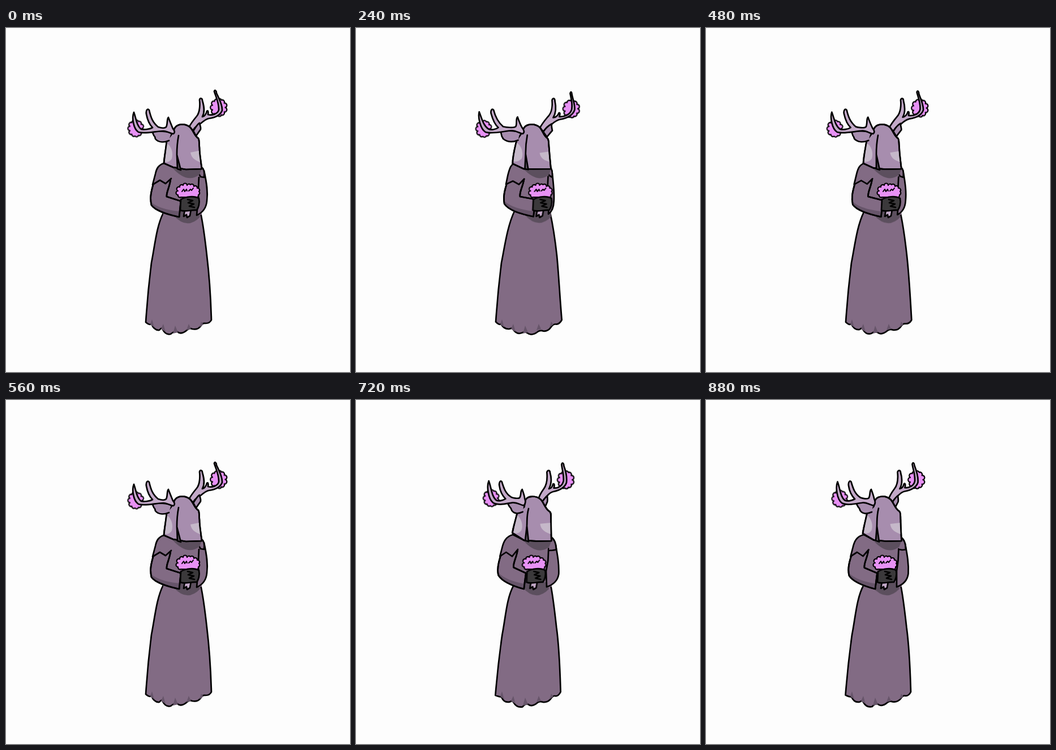
Animation, 608 px wide and 608 px high, one loop 0.96 s. Source, as an HTML page without scripts:

```html
<!DOCTYPE html>
<html lang="en">
<head>
<meta charset="utf-8">
<title>Swaying deer figure</title>
<style>
html, body { margin: 0; width: 100%; height: 100%; overflow: hidden; background: #fdfdfd; }
svg { display: block; width: 100vw; height: 100vh; }
path { stroke: #000; stroke-width: 2.7; stroke-linejoin: round; stroke-linecap: round; }

/* Each part has three poses: --a middle, --b right, --c left */
.m { d: var(--a); animation: morph .96s infinite; }
.t { animation: shift .96s infinite; }
@keyframes morph {
  0% { d: var(--a); animation-timing-function: steps(4); }
  33.333% { d: var(--b); animation-timing-function: steps(3); }
  58.333% { d: var(--a); animation-timing-function: steps(3); }
  83.333% { d: var(--c); animation-timing-function: steps(2); }
  100% { d: var(--a); }
}
@keyframes shift {
  0% { transform: none; animation-timing-function: steps(4); }
  33.333% { transform: translate(var(--b)); animation-timing-function: steps(3); }
  58.333% { transform: none; animation-timing-function: steps(3); }
  83.333% { transform: translate(var(--c)); animation-timing-function: steps(2); }
  100% { transform: none; }
}

.dress { fill: #826b84; }
.dim { fill: #67556a; }
.shade { fill: #5c4f5e; }
.head { fill: #a78dae; }
.light { fill: #c5b8c9; }
.antler { fill: #c3a9c8; }
.pink { fill: #e891f5; stroke-width: 2.2; }
.glove { fill: #3b393b; }
.flat { stroke: none; }
.line { fill: none; }

.skirt {
  --a: path("M278 327C266 350 263 385 257 415C252 455 249 490 247 520Q254 526 257 523Q262 535 271 534Q276 528 277 533Q282 543 291 541Q298 535 303 537Q310 543 321 533Q325 530 329 532Q339 534 344 527Q347 521 353 522Q360 522 363 516C362 480 359 435 355 402C352 375 348 345 344 327");
  --b: path("M281 322C268 350 263 385 257 415C252 455 249 490 247 519Q253 526 256 523Q262 533 272 531Q277 530 279 534Q285 542 294 538Q299 536 303 540Q311 546 323 537Q328 535 332 537Q340 537 345 529Q349 524 353 524Q359 525 364 516C360 480 358 435 355 402C352 375 347 345 343 327");
  --c: path("M279 328C266 350 265 385 259 415C253 455 249 490 246 523Q253 524 257 526Q262 537 273 533Q277 532 279 535Q285 545 296 543Q300 537 304 538Q312 544 322 535Q326 533 331 535Q339 535 344 529Q349 522 353 524Q357 524 361 516C360 480 359 435 354 402C351 375 348 345 344 327");
}
.torso {
  --a: path("M283 245L346 250L346 330L278 330Z");
  --b: path("M290 245L344 250L344 330L281 330Z");
  --c: path("M274 250L345 250L346 330L279 330Z");
}
.neck {
  --a: path("M294 247Q320 276 342 259L346 249Z");
  --b: path("M296 249Q322 276 341 259L344 249Z");
  --c: path("M296 248Q320 276 341 260L345 249Z");
}
.arm-r {
  --a: path("M341 264L340 284L340 300L337 331C348 326 354 318 355 306C357 290 355 275 350 252");
  --b: path("M339 262L338 284L342 300L341 328C346 324 348 316 348 306C349 290 347 275 345 252");
  --c: path("M340 262L339 284L334 304L337 330C348 327 358 320 360 308C360 290 357 275 354 256");
}
.cape-r {
  --a: path("M346 246C350 249 351 256 350 264L344 263L341 258");
  --b: path("M344 248C345 250 346 256 346 264L341 260L339 256");
  --c: path("M344 240C351 244 355 252 356 265L349 267L341 270");
}
.arm-l {
  --a: path("M262 270C256 290 254 300 257 313C264 323 284 329 306 334L309 306L284 298C283 290 290 280 291 266");
  --b: path("M270 270C264 288 262 298 264 310C272 322 292 328 316 333L320 302L292 298C290 290 297 280 299 267");
  --c: path("M256 268C249 284 246 298 249 308C256 320 272 328 292 334L296 306L276 295C274 286 282 276 283 263");
}
.cuff-l {
  --a: path("M257 313C264 323 284 329 305 333L306 324C285 322 265 316 257 308Z");
  --b: path("M264 310C272 322 292 328 315 332L316 324C294 321 274 315 264 305Z");
  --c: path("M249 308C256 320 272 328 291 333L292 325C274 321 258 314 249 304Z");
}
.cape-l {
  --a: path("M314 252L296 246L284 238C270 240 266 248 264 258L259 277L272 269L282 275L292 266");
  --b: path("M304 251L297 250L283 238C274 240 273 250 270 260L267 276L279 271L290 277L299 267");
  --c: path("M304 250L298 249L274 238C262 242 258 252 255 264L252 276L262 269L273 277L283 263");
}
.antler-r {
  --a: path("M323 176C326 170 332 162 337 156C343 149 343 134 342 127C343 123 347 124 347 128C350 138 352 148 347 157C350 157 354 152 355 147C357 145 358 148 357 153C364 155 374 152 376 145C377 133 371 122 368 112C369 108 372 111 372 115C376 124 383 136 382 146C378 156 366 159 358 160C350 162 345 169 340 172C336 173 332 178 331 181Z");
  --b: path("M325 178C329 170 334 164 339 158C347 151 349 139 348 128C349 123 353 124 353 129C355 139 354 151 349 159C353 159 358 156 360 151C362 150 362 154 360 158C370 158 381 153 383 143C385 134 383 124 382 117C383 112 385 114 385 119C386 128 389 137 388 144C385 154 374 160 362 162C355 163 349 168 346 171C340 172 335 180 333 184Z");
  --c: path("M321 178C322 171 325 164 329 158C335 150 336 140 335 128C337 123 341 124 341 129C344 139 342 149 338 157C342 157 344 153 345 149C347 148 348 152 346 157C355 157 361 150 362 142C363 132 361 124 361 115C362 110 365 112 365 117C368 126 368 138 367 146C364 156 352 161 344 163C338 164 336 168 334 171C332 174 330 178 329 181Z");
}
.ear-r {
  --a: path("M331 182C335 176 338 170 342 168C343 173 345 176 344 179C341 184 338 187 336 191Z");
  --b: path("M331 184C334 179 342 173 347 170C346 176 347 179 348 182C344 186 341 190 338 193Z");
  --c: path("M328 179C331 175 334 172 336 170C336 174 336 178 335 181C334 184 334 186 333 189Z");
}
.hood {
  --a: path("M284 199C283 212 280 226 279 239L295 246L318 250L346 249C345 238 342 224 342 212C341 204 342 198 340 195C333 191 332 182 325 175C316 168 303 169 298 177L294 186Z");
  --b: path("M284 198C280 212 276 224 276 240L297 250L312 249L344 249C343 238 342 224 341 212C340 203 341 198 338 195C331 191 330 182 325 176C316 168 301 169 296 177L292 186Z");
  --c: path("M285 201C282 212 277 222 275 233L298 249L318 249L345 249C345 238 346 222 346 212C346 204 347 199 343 198C335 193 333 183 328 177C319 168 303 169 300 177L299 190Z");
}
.light-l {
  --a: path("M284 204C292 208 296 220 293 231C290 236 286 237 281 237Z");
  --b: path("M283 202C292 206 297 222 293 230C288 236 282 236 277 236Z");
  --c: path("M284 203C292 208 296 222 292 230C287 237 281 236 277 233Z");
}
.light-r {
  --a: path("M326 220L341 217L344 238C337 234 328 232 326 220Z");
  --b: path("M324 221L340 219L341 236C334 234 326 232 324 221Z");
  --c: path("M325 218L345 217L345 237C336 234 326 230 325 218Z");
}
.slit {
  --a: path("M305 190C302 206 302 214 302 224L303 249L309 251L302 224");
  --b: path("M302 189C299 205 299 212 299 222L297 249L303 250L299 222");
  --c: path("M305 193C301 205 303 212 302 222L297 248L303 250L302 222");
}
.ear-l {
  --a: path("M292 185C282 182 268 182 258 183C261 187 260 190 263 192L264 196C269 202 278 203 288 199");
  --b: path("M289 184C280 181 266 181 254 183C257 187 255 190 257 193L259 196C265 200 274 203 286 198");
  --c: path("M299 184C291 178 282 178 272 180C274 185 276 188 279 191L281 195C284 200 290 201 298 197");
}
.antler-l {
  --a: path("M226 149C222 158 225 178 234 184C246 188 265 182 278 182C286 182 290 187 296 187C299 185 298 181 295 178C293 173 290 166 287 158C284 160 286 170 283 175C280 178 272 176 269 175C259 167 256 158 253 145C250 141 247 146 248 152C250 163 253 170 259 176C254 179 244 180 239 179C231 173 230 160 226 149Z");
  --b: path("M215 148C213 158 218 178 227 184C238 188 262 182 274 181C283 181 288 186 294 187C298 185 297 181 294 177C291 173 288 166 285 157C281 160 285 170 282 174C278 177 262 175 257 174C248 166 243 157 240 145C237 141 234 147 236 152C239 162 243 171 249 176C244 180 236 181 232 178C223 172 220 160 215 148Z");
  --c: path("M239 140C235 150 238 173 246 180C254 187 268 183 276 181C286 180 290 185 296 186C300 184 301 178 300 173C300 168 299 163 297 158C293 161 296 167 292 172C289 173 282 172 277 170C267 165 264 155 260 144C258 141 255 146 256 151C257 160 261 168 267 174C262 177 256 179 252 176C244 169 244 153 239 140Z");
}
.bloom-l { --b: -5px, 1px; --c: 14px, -6px; }
.bloom-r { --b: 6px, 3px; --c: -8px, 1px; }
.hands { --b: 6px, 0px; --c: -10px, 0px; }
.waist { --b: 3px, -1px; --c: -3px, 0px; }
</style>
</head>
<body>
<svg viewBox="0 0 608 608">
  <defs>
    <path id="bloom" class="pink" d="M11.5 0A3.700 3.700 0 0 1 9.700 7.300A3.700 3.700 0 0 1 4.800 12.300A3.700 3.700 0 0 1-1.600 13.400A3.700 3.700 0 0 1-7.500 10.300A3.700 3.700 0 0 1-11 3.800A3.700 3.700 0 0 1-11-3.800A3.700 3.700 0 0 1-7.500-10.300A3.700 3.700 0 0 1-1.600-13.400A3.700 3.700 0 0 1 4.800-12.300A3.700 3.700 0 0 1 9.700-7.300A3.700 3.700 0 0 1 11.500 0Z"/>
  </defs>

  <path class="skirt m dress"/>
  <path class="flat dim" d="M255 524l3-9 4 14zM274 532l4-9 4 14zM295 540l4-14 5 12zM319 534l4-11 4 9zM342 529l3-10 4 5z"/>
  <path class="torso m dress flat"/>
  <g class="waist t"><path class="flat shade" d="M296 331Q320 358 343 334L340 322H300Z"/></g>
  <path class="arm-r m dress"/>
  <path class="cape-r m dress"/>
  <path class="arm-l m dress"/>
  <path class="cuff-l m dim flat"/>
  <path class="arm-l m line"/>
  <path class="cape-l m dress"/>
  <path class="neck m shade flat"/>

  <g class="hands t">
    <path class="antler" stroke-width="2" d="M316 321L314 333L319 330L320 335L325 332L327 321Z"/>
    <path class="pink" d="M309 299a3.500 3.500 0 0 1-5-4a3.500 3.500 0 0 1 0-7a3.500 3.500 0 0 1 3-7a3.500 3.500 0 0 1 6-3a3.500 3.500 0 0 1 7 0a3.500 3.500 0 0 1 6-1a3.500 3.500 0 0 1 6 3a3.500 3.500 0 0 1 6 3a3.500 3.500 0 0 1 3 6a3.500 3.500 0 0 1-1 6a3.500 3.500 0 0 1-5 4Z"/>
    <path class="line" style="stroke-width:2" d="M311 289l3-4 2 4 3-4 1 3M323 288l3-3 2 2 3-4"/>
    <path class="glove" d="M309 303C318 298 332 296 341 301C343 310 340 318 337 322C326 321 316 326 308 322Z"/>
    <path class="line" d="M321 303l9 2-8 4 10 2-8 4 9 2"/>
  </g>

  <g class="bloom-r t"><use href="#bloom" transform="translate(376 140.500) scale(1 1.060)"/></g>
  <path class="antler-r m antler"/>
  <path class="ear-r m head"/>
  <path class="hood m head"/>
  <path class="light-l m light flat"/>
  <path class="light-r m light flat"/>
  <path class="hood m line"/>
  <path class="slit m shade"/>
  <path class="ear-l m head"/>
  <g class="bloom-l t"><use href="#bloom" transform="translate(229.500 177.500) scale(.95 1)"/></g>
  <path class="antler-l m antler"/>
</svg>
</body>
</html>
```
